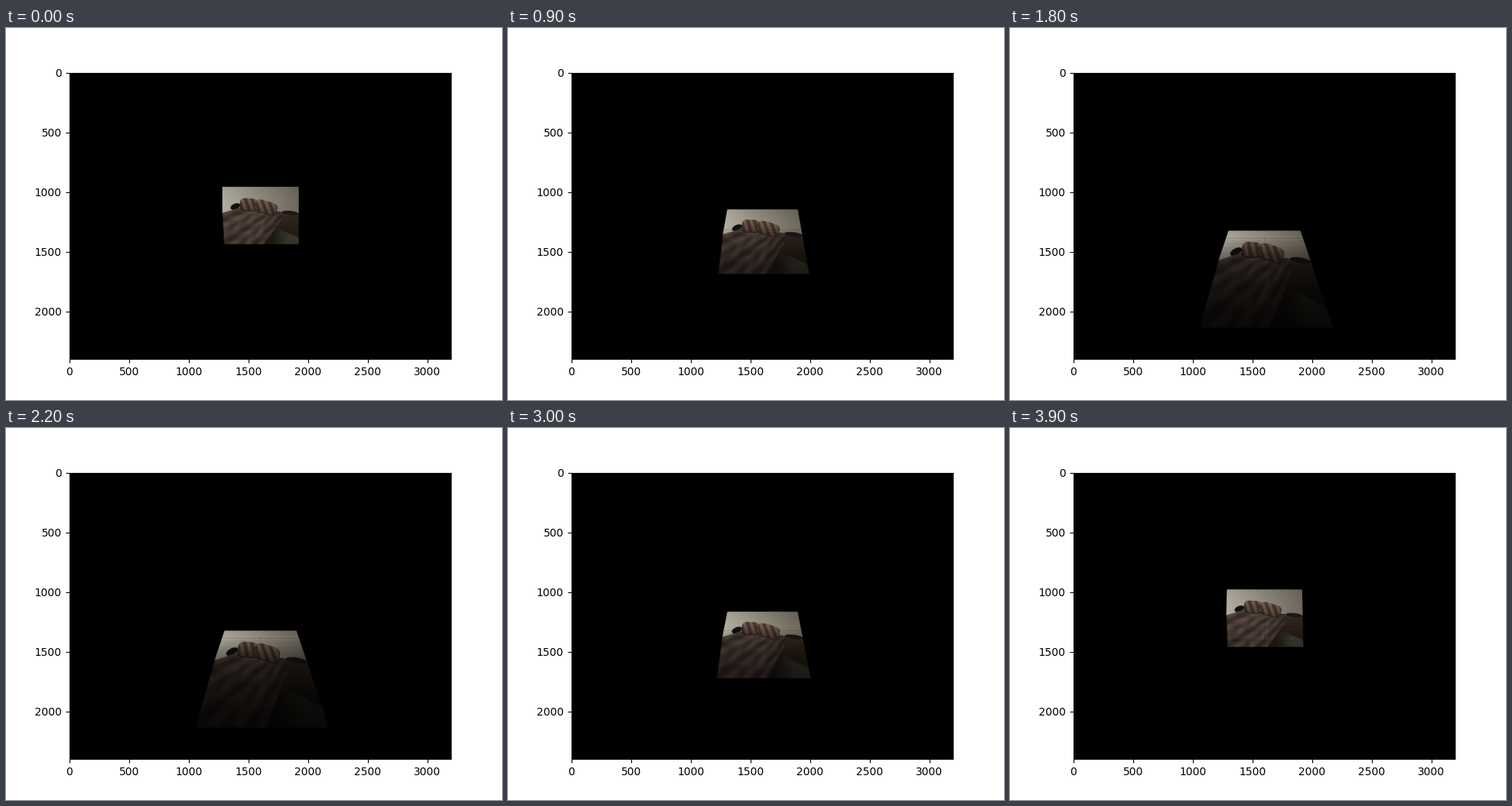
Animation of 640 by 480 pixels, one loop 4000 ms. Source, as a matplotlib script:

```python
import numpy as np
import matplotlib.pyplot as plt
from matplotlib.animation import FuncAnimation

W, H = 640, 480              # photo size
CANVAS_W, CANVAS_H = 3200, 2400
FOCAL = 560
FRAMES, STEP = 40, 2         # tilt grows by STEP degrees, then returns
# part of the canvas the photo can reach, cut along whole screen pixels
X0, X1, Y0, Y1 = 909, 2285, 954, 2316

V, U = np.mgrid[0:H, 0:W].astype(float)


def blend(low, high, t):
    t = np.clip(t, 0, 1)[..., None]
    return np.array(low) * (1 - t) + np.array(high) * t


def shade(color, amount, t):
    return color * (1 - amount * np.clip(t, 0, 1))[..., None]


def put(img, mask, color):
    img[mask] = color[mask] if np.ndim(color) == 3 else color


def blob(cx, cy, rx, ry, turn=0.0, power=2):
    """Rounded shape turned clockwise; a higher power gives squarer corners."""
    x, y = U - cx, V - cy
    a = (x * np.cos(turn) + y * np.sin(turn)) / rx
    b = (y * np.cos(turn) - x * np.sin(turn)) / ry
    return np.abs(a) ** power + np.abs(b) ** power < 1


def make_photo():
    # wall, lit from the left
    img = blend((178, 174, 161), (110, 104, 92), U / W)
    img = shade(img, 0.08, 1 - V / 120)

    # night stand, floor and the dark things around them
    stand = blend((54, 41, 32), (33, 27, 22), (V - 210) / 180)
    put(img, (U > 440) & (V > 208 + 0.1 * (U - 490)), stand)
    floor = blend((28, 25, 20), (54, 51, 41), (U - 420) / 120)
    put(img, (U > 320) & (V > 350 + 0.4 * (U - 460)), floor)
    put(img, blob(570, 218, 70, 17, 0.12), (27, 25, 22))
    put(img, blob(108, 164, 42, 24, -0.4), (18, 17, 16))

    # cover with soft bands fanning out from the far right
    angle = np.arctan2(V + 40, 760 - U)
    reach = np.hypot(V + 40, 760 - U)
    bands = 0.5 + 0.3 * np.sin(angle * 60) + 0.15 * np.sin(angle * 27 + 1)
    bands += 0.18 * np.sin(reach / 22 + 2 * np.sin(angle * 30))
    cover = blend((52, 42, 38), (94, 77, 68), bands)
    cover = shade(cover, 0.15, (V - 200) / 280)
    cover = shade(cover, 0.25, (U - 330) / 150)
    top = np.interp(U, [0, 150, 500], [218, 172, 212])
    side = np.interp(V, [200, 290, 480], [500, 488, 345])
    put(img, (V > top) & (U < side), cover)
    put(img, U < 18 * (V - 215) / 265, (6, 6, 6))

    # two pillows
    for cx, cy, rx, turn in ((222, 146, 72, 0.08), (366, 168, 90, 0.28)):
        wave = np.sin((U - cx - 0.35 * (V - cy)) / 9)
        cloth = blend((66, 49, 41), (118, 96, 81), 0.5 + 0.5 * wave)
        cloth = shade(cloth, 0.3, (V - cy + 40) / 90)
        put(img, blob(cx, cy + 6, rx + 4, 53, turn, 4), (42, 34, 30))
        put(img, blob(cx, cy, rx, 50, turn, 4), cloth)
    return np.clip(img, 0, 255).astype(np.uint8)


PHOTO = make_photo()


def tilt(degrees):
    """Send every photo pixel to its place on the canvas; gaps stay black."""
    t = np.radians(degrees)
    x, y = U - W / 2, V - H / 2
    w = np.cos(t) - y * np.sin(t) / FOCAL
    px = x / w + CANVAS_W / 2
    py = (y * np.cos(t) + FOCAL * np.sin(t)) / w + CANVAS_H / 2
    cols = np.floor(px + 1e-9).astype(int) - X0
    rows = np.floor(py + 1e-9).astype(int) - Y0
    out = np.zeros((Y1 - Y0, X1 - X0, 3), np.uint8)
    out[rows, cols] = PHOTO
    return out


fig, ax = plt.subplots(figsize=(6.4, 4.8), dpi=100)
ax.set_facecolor("black")
view = ax.imshow(tilt(0), extent=(X0 - 0.5, X1 - 0.5, Y1 - 0.5, Y0 - 0.5))
ax.set_xlim(-0.5, CANVAS_W - 0.5)
ax.set_ylim(CANVAS_H - 0.5, -0.5)


def draw(i):
    view.set_data(tilt(STEP * min(i, FRAMES - i)))
    return [view]


anim = FuncAnimation(fig, draw, frames=FRAMES, init_func=lambda: draw(0),
                     interval=100, repeat=True, repeat_delay=0)
plt.show()
```
